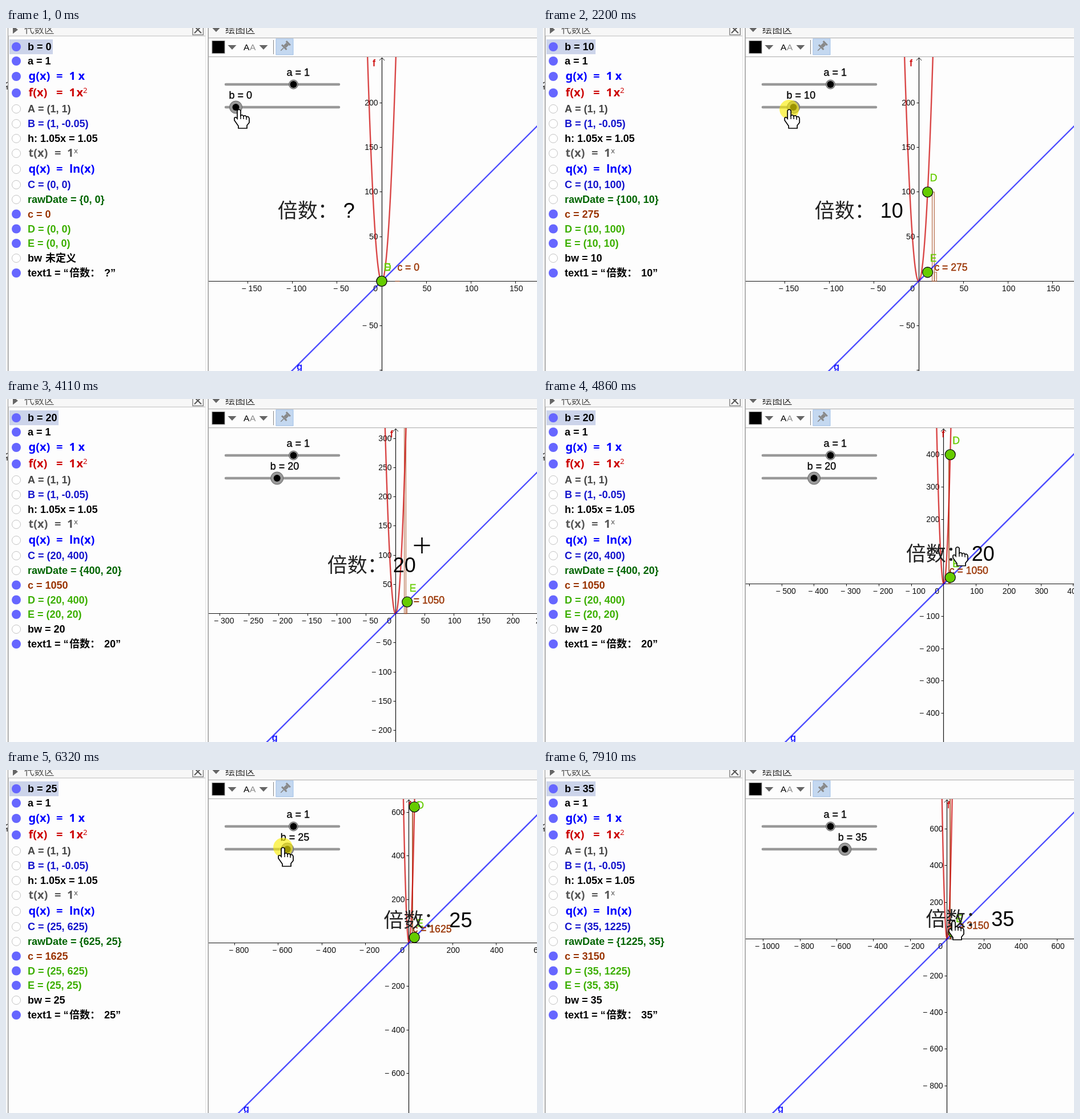
Write an HTML page with a canvas that moves like this. It is 930 px wide and 602 px high and loops after 8 s.

```html
<!DOCTYPE html>
<html lang="zh">
<head>
<meta charset="utf-8">
<style>
html, body { margin: 0; width: 100%; height: 100%; overflow: hidden; background: #fdfdfd; }
canvas { display: block; }
</style>
</head>
<body>
<canvas id="stage" width="930" height="602"></canvas>
<script>
const ctx = document.getElementById('stage').getContext('2d');
const LOOP = 8000;
const SANS = '"Liberation Sans", "Noto Sans CJK SC", "Noto Sans CJK", sans-serif';
const MATH = '"Noto Sans", sans-serif';
const CJK = '"Noto Sans CJK SC", "Noto Sans CJK", sans-serif';
const VIEW = { left: 355, top: 51, right: 930, bottom: 602 };

// Time, value of slider b
const B_STEPS = [[0, 0], [990, 5], [1800, 10], [2650, 15], [3200, 20], [6320, 25], [6600, 30], [6850, 35]];
// Time, pixels per unit, origin x, origin y
const ZOOM = [
  [0, 1.565, 658, 444.4], [3650, 1.565, 658, 444.4], [4110, 1.025, 682.2, 376.7], [4190, 1.025, 682.2, 376.7],
  [4660, .62, 699.6, 330.5], [4790, .62, 699.6, 330.5], [4860, .5675, 701.9, 324.6], [4970, .5675, 701.9, 324.6],
  [5400, .3815, 705.8, 303.4], [7560, .3815, 705.8, 303.4], [7900, .322, 707.7, 296.7]
];
// Time, x, y of the pointer
const POINTER = [
  [0, 408, 143], [850, 408, 143], [1130, 415, 143], [1380, 415, 143], [2130, 431, 143], [2410, 432, 143],
  [2840, 453, 139], [3080, 453, 139], [3270, 472, 131], [3390, 472, 131], [3640, 728.5, 257], [4300, 728.5, 257],
  [4790, 726, 260], [5400, 726, 258], [5560, 619, 210], [5980, 483, 137], [6180, 481, 136], [6320, 485, 136],
  [6600, 503, 136], [6850, 520, 136], [7260, 521, 136], [7500, 719, 263], [7900, 719, 265]
];

function sample(track, t) {
  const i = track.findIndex(k => k[0] > t);
  if (i < 0) return track[track.length - 1].slice(1);
  const a = track[i - 1], z = track[i], p = (t - a[0]) / (z[0] - a[0]);
  return a.slice(1).map((v, j) => v + (z[j + 1] - v) * p);
}

// Centre of the pixel that holds v, for crisp thin lines
const snap = v => Math.floor(v) + .5;

function text(str, x, y, size, color, { weight = 400, family = SANS, align = 'left', ink = 0 } = {}) {
  ctx.font = `${weight} ${size}px ${family}`;
  ctx.textAlign = align;
  ctx.fillStyle = color;
  ctx.fillText(str, x, y);
  if (!ink) return;
  ctx.strokeStyle = color;
  ctx.lineWidth = ink;
  ctx.strokeText(str, x, y);
}

function rect(x, y, w, h, color) {
  ctx.fillStyle = color;
  ctx.fillRect(x, y, w, h);
}

function line(points, color, width = 1) {
  ctx.beginPath();
  points.forEach(([x, y]) => ctx.lineTo(x, y));
  ctx.strokeStyle = color;
  ctx.lineWidth = width;
  ctx.stroke();
}

function disc(x, y, r, fill, stroke, width = 1) {
  ctx.beginPath();
  ctx.arc(x, y, r, 0, 7);
  if (fill) { ctx.fillStyle = fill; ctx.fill(); }
  if (stroke) { ctx.strokeStyle = stroke; ctx.lineWidth = width; ctx.stroke(); }
}

function triangle(points, color) {
  ctx.beginPath();
  points.forEach(([x, y]) => ctx.lineTo(x, y));
  ctx.fillStyle = color;
  ctx.fill();
}

const dropArrow = (x, y, color = '#666') => triangle([[x - 7.5, y - 4], [x + 7.5, y - 4], [x, y + 4]], color);

function drawPanel(b) {
  rect(0, 0, 355, 602, '#fdfdfd');
  rect(0, 0, 3, 602, '#f4f4f4');
  line([[0, 97], [3, 95]], '#333', 1.5);
  line([[0, 103], [2, 102], [2, 108]], '#333', 1.5);
  rect(3, 0, 1.5, 602, '#999');
  rect(4, 0, 346, 14, '#f7f7f7');
  rect(4, 13.5, 346, 1, '#bbb');
  triangle([[12, -4], [21, 3], [12, 10]], '#666');
  text('代数区', 32, 9, 17.5, '#555', { family: CJK });
  ctx.strokeStyle = '#888';
  ctx.lineWidth = 1.5;
  ctx.strokeRect(327, -6, 18.5, 18);
  line([[330, -3], [342, 9]], '#555', 2);
  line([[342, -3], [330, 9]], '#555', 2);
  rect(349, 0, 1, 602, '#e2e2e2');
  rect(353.5, 0, 1.5, 602, '#999');

  rect(6, 20, b > 9 ? 86 : 76, 26, '#ccd4ea');
  const sq = b * b, point = y => `(${b}, ${y})`;
  const bold = (str, color = '#000') => y => text(str, 38, y + 6, 18, color, { weight: 700 });
  const math = (color, parts) => y => parts.forEach(([str, x, sup]) =>
    text(str, x, y + (sup ? 0 : 6), sup ? 13 : 20, color, { weight: sup ? 500 : 600, family: MATH }));
  const bw = b ? bold(`bw = ${b}`) : y => {
    bold('bw')(y);
    text('未定义', 69, y + 6, 18, '#000', { weight: 700, family: CJK });
  };
  const text1 = y => {
    bold('text1 = “')(y);
    text('倍数：', 111, y + 6, 18, '#000', { weight: 700, family: CJK });
    text(`${b || '?'}”`, 172, y + 6, 18, '#000', { weight: 700 });
  };
  const rows = [
    [33, 1, bold(`b = ${b}`)],
    [58, 1, bold('a = 1')],
    [85, 1, math('#0000ff', [['g(x)', 39.5], ['=', 88], ['1', 110.5], ['x', 126.5]])],
    [114, 1, math('#cc0000', [['f(x)', 39.5], ['=', 88], ['1', 110.5], ['x', 123.5], ['2', 135, true]])],
    [142, 0, bold('A = (1, 1)', '#444')],
    [168, 0, bold('B = (1, -0.05)', '#1414cc')],
    [194, 0, bold('h: 1.05x = 1.05')],
    [220, 0, math('#555', [['t(x)', 39.5], ['=', 85], ['1', 107], ['x', 119, true]])],
    [248, 0, math('#0000ff', [['q(x)', 39.5], ['=', 88], ['ln(x)', 111]])],
    [275, 0, bold('C = ' + point(sq), '#1414cc')],
    [301, 0, bold(`rawDate = {${sq}, ${b}}`, '#006400')],
    [326.5, 1, bold(`c = ${2.5 * (sq + b)}`, '#993300')],
    [352.5, 1, bold('D = ' + point(sq), '#3caf00')],
    [378, 1, bold('E = ' + point(b), '#3caf00')],
    [404, 0, bw],
    [430, 1, text1]
  ];
  for (const [y, shown, label] of rows) {
    shown ? disc(18, y, 8, '#6666ff') : disc(18, y, 7.5, '#fff', '#c4c4c4');
    label(y);
  }
}

function drawToolbar() {
  rect(355, 0, 575, 51, '#fdfdfd');
  rect(355, 0, 575, 17, '#f7f7f7');
  dropArrow(368, 3);
  text('绘图区', 384, 9, 17.5, '#333', { family: CJK });
  rect(355, 17, 575, 1, '#aaa');
  rect(355, 50, 575, 1, '#aaa');
  rect(360.5, 22, 23, 23, '#888');
  rect(361.5, 23, 21, 21, '#000');
  dropArrow(396, 34);
  text('A', 416, 39, 15.5, '#000');
  text('A', 427, 39, 15.5, '#888');
  dropArrow(451, 34);
  rect(468, 21, 1, 25, '#888');
  rect(472.5, 18.5, 31, 29, '#9fc0e8');
  rect(473.5, 19.5, 29, 27, '#c4d8f0');
  ctx.save();
  ctx.translate(489, 32);
  ctx.rotate(Math.PI / 4);
  rect(-5, -9, 10, 3, '#888');
  rect(-3, -6, 6, 7, '#888');
  rect(-6, 1, 12, 3, '#888');
  rect(-.8, 4, 1.6, 7, '#888');
  ctx.restore();
}

function drawAxes(s, ox, oy) {
  const target = 95 / s, power = 10 ** Math.floor(Math.log10(target)), n = target / power;
  const step = power * (n > 5 ? 5 : n > 2 ? 2 : 1);
  const black = '#111', ax = snap(ox), ay = snap(oy);
  const name = v => v < 0 ? '− ' + -v : String(v);
  line([[355, ay], [930, ay]], black, 1.2);
  line([[ax, 52], [ax, 602]], black, 1.2);
  line([[ax - 4.5, 57], [ax, 52], [ax + 4.5, 57]], black);
  for (let v = Math.ceil((355 - ox) / s / step) * step; ox + v * s < 950; v += step) {
    if (!v) continue;
    const x = ox + v * s, label = name(v);
    line([[snap(x), ay], [snap(x), ay + 4]], black);
    ctx.font = `14px ${SANS}`;
    const left = x + (v < 0 ? 7 : 1) - ctx.measureText(label).width / 2;
    if (left > 355) text(label, left, ay + 17, 14, black);
  }
  for (let v = Math.ceil((oy - 602) / s / step) * step; oy - v * s > 53.5; v += step) {
    if (!v) continue;
    const y = snap(oy - v * s);
    line([[ax - 4, y], [ax, y]], black);
    if (y < 595) text(name(v), ax - 7, y + 4.5, 14, black, { align: 'right' });
  }
  text('0', ax - 7.5, ay + 17, 14, black, { align: 'right' });
}

function drawPoint(name, x, y) {
  if (y < 45) return;
  disc(x, y, 9, '#66cc00', '#111', 1.3);
  text(name, x + 4, Math.max(y - 18.5, 68), 17.6, '#66cc00', { ink: .4 });
}

function drawSlider(name, value, x, y, halo) {
  ctx.lineCap = 'round';
  line([[385, y], [583, y]], '#999', 4.5);
  ctx.lineCap = 'butt';
  disc(x, y, halo, '#999', '#666');
  disc(x, y, 6, '#000');
  text(`${name} = ${value}`, x - 12, y - 15, 18, '#000', { ink: .3 });
}

function drawGraph(b, s, ox, oy) {
  ctx.save();
  ctx.beginPath();
  ctx.rect(VIEW.left, VIEW.top, 575, 551);
  ctx.clip();
  rect(VIEW.left, VIEW.top, 575, 551, '#fdfdfd');
  drawAxes(s, ox, oy);

  ctx.lineWidth = 1;
  for (const [start, height] of [[15, b * b], [17.5, b]]) {
    const left = snap(ox + start * s), right = snap(ox + (start + 2.5) * s);
    const bar = [left, oy - height * s, right - left, height * s];
    rect(...bar, 'rgba(153,51,0,.1)');
    ctx.strokeStyle = 'rgba(153,51,0,.7)';
    ctx.strokeRect(...bar);
  }

  const parabola = [];
  for (let dx = -30; dx <= 30; dx += .5) parabola.push([ox + dx, oy - dx * dx / s]);
  line(parabola, 'rgba(204,0,0,.72)', 2.4);
  const drop = 602 - oy;
  line([[ox - drop - 5, 607], [ox + oy, 0]], 'rgba(0,0,255,.7)', 2.4);
  text('f', ox - Math.sqrt((oy - 51) * s) + 9, 67, 17, '#cc0000', { ink: .3 });
  text('g', ox - drop + 9, 600, 17, '#0000ff', { ink: .3 });

  text(`c = ${2.5 * (b * b + b)}`, ox + 17.5 * s, oy - 18, 17.6, '#993300', { ink: .4 });
  drawPoint('D', ox + b * s, oy - b * b * s);
  drawPoint('E', ox + b * s, oy - b * s);
  const tx = ox - 116.5 * s, ty = oy - 71 * s;
  text('倍数：', tx, ty, 35, '#222', { weight: 300, family: CJK });
  text(b || '?', tx + 115, ty, 36, '#000');

  drawSlider('a', 1, 503.5, 99, 8);
  drawSlider('b', b, 402.5 + 3.61 * b, 139, 11);
  ctx.restore();
  return [tx, ty];
}

const HAND = new Path2D('M-3 2Q0 -2 3 2V11Q6 8 8 12Q11 9 13 13Q17 11 18 16V23L14 28V33H-1V29L-8 19V15Q-6 12 -3 16Z');

function drawPointer(x, y, pressed, isHand) {
  if (pressed) disc(x, y, 17, 'rgba(250,238,0,.62)');
  if (!isHand) {
    line([[x - 14, y], [x + 14, y]], '#000', 2.5);
    line([[x, y - 14], [x, y + 14]], '#000', 2.5);
    return;
  }
  ctx.save();
  ctx.translate(x, y);
  ctx.fillStyle = '#fff';
  ctx.fill(HAND);
  ctx.strokeStyle = '#000';
  ctx.lineWidth = 1.7;
  ctx.stroke(HAND);
  line([[3, 10], [3, 17]], '#000', 1.4);
  line([[8, 12], [8, 17]], '#000', 1.4);
  line([[13, 13], [13, 18]], '#000', 1.4);
  ctx.restore();
}

function draw(now) {
  const t = now % LOOP;
  const b = B_STEPS.filter(k => k[0] <= t).pop()[1];
  const [x, y] = sample(POINTER, t);
  const pressed = (t >= 580 && t < 3390) || (t >= 6180 && t < 7010);
  const [tx, ty] = drawGraph(b, ...sample(ZOOM, t));
  drawToolbar();
  drawPanel(b);
  const overText = x > tx && x < tx + 155 && Math.abs(y - ty + 13) < 24;
  const overSlider = y < 150 && x < 540;
  drawPointer(x, y, pressed, overText || overSlider);
  requestAnimationFrame(draw);
}
requestAnimationFrame(draw);
</script>
</body>
</html>
```
